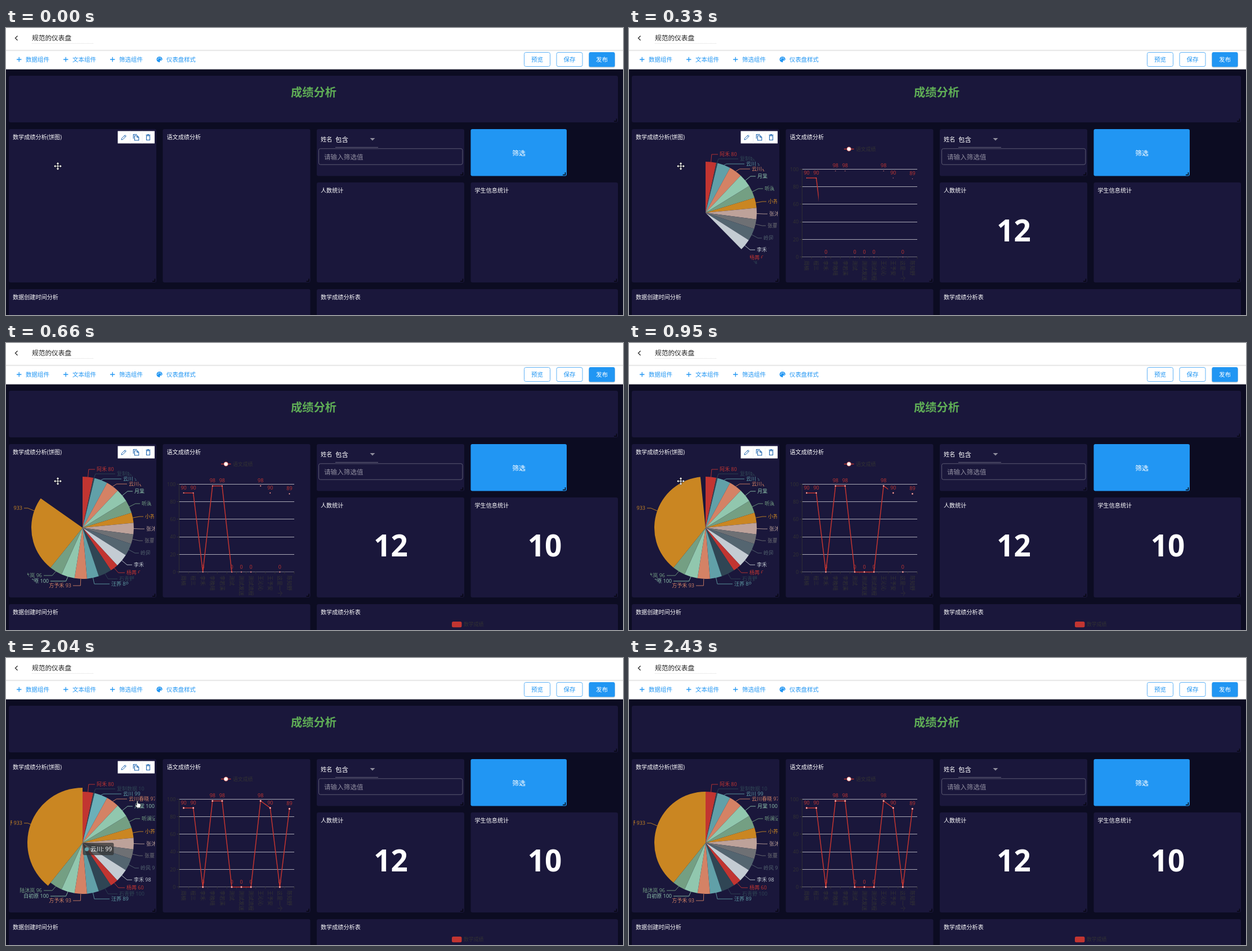
Write an HTML page that moves like this. It is 1096 px wide and 511 px high and loops after 2750 ms.

```html
<!DOCTYPE html>
<html lang="zh-CN">
<head>
<meta charset="utf-8">
<title>仪表盘</title>
<style>
html, body { margin: 0; width: 100%; height: 100%; overflow: hidden; background: #0c0c22; }
svg { display: block; width: 1096px; height: 511px; }
text { font-family: "Open Sans", "Noto Sans CJK SC", "Noto Sans CJK", sans-serif; white-space: pre; }
</style>
</head>
<body>
<svg id="stage" viewBox="0 0 1096 511" xmlns="http://www.w3.org/2000/svg">
  <defs>
    <clipPath id="pieBox"><rect x="8" y="208" width="256.5" height="243"/></clipPath>
    <clipPath id="sweep"><path id="sweepPath"/></clipPath>
    <clipPath id="lineBox"><rect x="282" y="205" width="255" height="246"/></clipPath>
    <clipPath id="wipe"><rect id="wipeRect" x="307" y="240" height="175"/></clipPath>
  </defs>
  <g id="chrome"></g>
  <g id="charts">
    <g clip-path="url(#pieBox)"><g id="pie" clip-path="url(#sweep)"></g></g>
    <g id="line" clip-path="url(#lineBox)"></g>
  </g>
  <g id="count"></g>
  <g id="students"></g>
  <g id="tableLegend"></g>
  <g id="tools"></g>
  <g id="tip"></g>
  <g id="move"></g>
  <g id="hand"></g>
</svg>
<script>
const LOOP = 2750, START = 180, DURATION = 1030;
// The screen refreshes only at these moments (ms).
const TICKS = [0, 170, 250, 330, 410, 490, 570, 660, 720, 800, 880, 950, 1020, 1100, 1180,
  2040, 2110, 2190, 2270, 2350, 2430];
const SETTLED = 1180, LEAVE = 2040, GONE = 2430;
const BLUE = '#2196f3', RED = '#c23531', CARD = '#1a173b', ICON = '#1a62ae';
const PALETTE = [RED, '#2f4554', '#61a0a8', '#d48265', '#91c7ae', '#749f83', '#ca8622',
  '#bda29a', '#6e7074', '#546570', '#c4ccd3'];

const $ = id => document.getElementById(id);

function add(parent, tag, attrs) {
  const el = document.createElementNS('http://www.w3.org/2000/svg', tag);
  for (const key in attrs) el.setAttribute(key, attrs[key]);
  return parent.appendChild(el);
}
const rect = (g, x, y, width, height, fill, more) =>
  add(g, 'rect', { x, y, width, height, fill, ...more });
const stroke = (g, d, color, width = 1, more) =>
  add(g, 'path', { d, fill: 'none', stroke: color, 'stroke-width': width, ...more });
// y is the visual middle of the text
function label(g, str, x, y, size, fill, more) {
  const el = add(g, 'text', { x, y: y + size * 0.37, 'font-size': size, fill, ...more });
  el.textContent = str;
  return el;
}
const MIDDLE = { 'text-anchor': 'middle' }, END = { 'text-anchor': 'end' };

function card(g, x, y, w, h, title, fill = CARD) {
  rect(g, x, y, w, h, fill, { rx: 3 });
  stroke(g, `M${x + w - 2.5} ${y + h - 6.5}v4.5h-4.5`, '#06060f', 1.5);
  if (title) label(g, title, x + 7, y + 14.5, 10.15, '#fff', { 'font-weight': 500 });
}

function buildChrome(g) {
  rect(g, 0, 0, 1096, 73.6, '#fff');
  rect(g, 0, 39, 1096, 1, '#dedede');
  rect(g, 0, 40, 1096, 1.5, '#f3f3f3');
  stroke(g, 'M20.5 14l-4 4 4 4', '#333', 1.4);
  label(g, '规范的仪表盘', 46, 18, 11.7, '#222');
  stroke(g, 'M46 27.5H156', '#ccc', 0.8, { 'stroke-dasharray': '1 1.2' });

  [['数据组件', 23], ['文本组件', 106], ['筛选组件', 189]].forEach(([name, x]) => {
    stroke(g, `M${x - 4} 56h8.4M${x + 0.2} 51.8v8.4`, BLUE, 1.3);
    label(g, name, x + 12, 56, 10.5, BLUE);
  });
  add(g, 'path', { fill: BLUE, d: 'M272.5 51a5 5 0 0 0 0 10q1.6-.2 1-1.8-.4-1.4 1.2-1.4h1.2q2-.2 1.9-2.3a5 4.6 0 0 0-5.3-4.5z' });
  [[269.8, 55.6], [271.4, 53.4], [274, 53.4], [275.7, 55.5]].forEach(([cx, cy]) =>
    add(g, 'circle', { cx, cy, r: 0.8, fill: '#fff' }));
  label(g, '仪表盘样式', 285, 56, 10.4, BLUE);

  [['预览', 920.5], ['保存', 978]].forEach(([name, x]) => {
    rect(g, x, 43.5, 46, 25, '#fff', { rx: 3, stroke: '#5fb2f6' });
    label(g, name, x + 23, 56, 10.6, BLUE, MIDDLE);
  });
  rect(g, 1035, 44.5, 47, 26, '#c9ced3', { rx: 3 });
  rect(g, 1035.5, 43, 46, 26.3, BLUE, { rx: 3 });
  label(g, '发布', 1058.5, 56, 10.6, '#fff', MIDDLE);

  card(g, 5, 85, 1082, 83);
  label(g, '成绩分析', 546.5, 114.5, 20.3, '#5fad56', { ...MIDDLE, 'font-weight': 700 });
  card(g, 5, 180, 262, 273, '数学成绩分析(饼图)');
  card(g, 278.5, 180, 262, 273, '语文成绩分析');
  card(g, 552, 180, 262, 83.5);
  card(g, 825.5, 180, 170.5, 83.5, '', BLUE);
  card(g, 552, 275, 262, 178, '人数统计');
  card(g, 825.5, 275, 261.5, 178, '学生信息统计');
  card(g, 5, 465, 535.5, 80, '数据创建时间分析');
  card(g, 552, 465, 535, 80, '数学成绩分析表');

  label(g, '姓名', 559, 198.5, 10.3, '#fff');
  label(g, '包含', 585, 198.5, 11.5, '#fff');
  stroke(g, 'M585 212.5h76', '#64627a');
  add(g, 'path', { d: 'M646.5 196h9l-4.5 4.5z', fill: '#8f8d9d' });
  rect(g, 555.5, 214.8, 255.5, 28.4, 'none', { rx: 3, stroke: '#64627a', 'stroke-width': 0.9 });
  label(g, '请输入筛选值', 565, 229.5, 11.6, '#8f8d9f');
  label(g, '筛选', 911, 222.5, 11.8, '#fff', MIDDLE);
}

const CX = 136, CY = 329, R = 91;
function polar(angle, r) {
  return [CX + r * Math.sin(angle), CY - r * Math.cos(angle)];
}
function sector(from, to, r) {
  return `M${CX} ${CY}L${polar(from, r)}A${r} ${r} 0 ${to - from > Math.PI ? 1 : 0} 1 ${polar(to, r)}Z`;
}

// name, value, text x, text y
const SLICES = [
  ['阿禾', 80, 161, 225], ['复制数据', 10, 197, 233], ['云川', 99, 208, 242],
  ['云川春晓', 97, 218, 251], ['月棠', 100, 228, 264], ['听澜记', 96, 241, 286],
  ['小荞', 76, 247, 309], ['张沐', 85, 249, 331], ['张蔓', 73, 246, 352],
  ['岭风', 93, 239, 374], ['李禾', 98, 227, 395], ['杨苒', 60, 214, 409],
  ['石青野', 100, 201, 420], ['汪荞', 89, 187, 429], ['方予禾', 93, 116, 432],
  ['白初原', 100, 76, 424], ['陆沐岚', 96, 64, 414], ['田野', 933, 29, 294]
];
const TOTAL = SLICES.reduce((sum, s) => sum + s[1], 0);
const slices = [];

function buildPie(g) {
  let angle = 0;
  SLICES.forEach(([, value], i) => {
    const from = angle, color = PALETTE[i % PALETTE.length];
    angle += value / TOTAL * 2 * Math.PI;
    const el = add(g, 'path', { d: sector(from, angle, R), fill: color });
    slices.push({ el, from, to: angle, color });
  });
  SLICES.forEach(([name, value, x, y], i) => {
    const { from, to, color } = slices[i], mid = (from + to) / 2;
    const left = mid > Math.PI;
    stroke(g, `M${polar(mid, R)}L${polar(mid, 103)[0]} ${y}H${x + (left ? 3 : -3)}`, color, 0.9);
    label(g, `${name} ${value}`, x, y, 9, color, left ? END : {});
  });
}

const SCORES = [90, 90, 0, 98, 98, 0, 0, 0, 98, 90, 0, 89];
const PUPILS = ['周楠', '程三', '李禾', '李晚晴', '李若溪', '测试', '测试发送', '测试流程',
  '王沁沁', '王予安', '这是一个测', '陈知野'];
const px = i => 307 + 205 / 12 * (i + 0.5);
const py = v => 407.7 - 1.564 * v;
const dots = [];

function buildLine(g) {
  stroke(g, 'M382 215.5h17.5', RED, 1.4);
  add(g, 'circle', { cx: 390.7, cy: 215.5, r: 3.8, fill: '#fff', stroke: RED, 'stroke-width': 0.8 });
  label(g, '语文成绩', 403, 215.5, 8.9, '#333');
  for (let v = 0; v <= 100; v += 20) {
    const y = Math.floor(py(v)) + 0.5;
    stroke(g, `M307 ${y}h205`, v ? '#bdbdc6' : '#74747f', 0.9);
    stroke(g, `M303.5 ${y}h3.5`, '#333', 0.9);
    label(g, v, 301.5, py(v), 9, '#333', END);
  }
  stroke(g, 'M307.5 251V407', '#333', 0.9);
  for (let i = 0; i <= 12; i++) stroke(g, `M${307 + i * 205 / 12} 407.5v3.5`, '#333', 0.9);
  PUPILS.forEach((name, i) =>
    label(g, name, 0, 0, 9, '#333', { transform: `translate(${px(i)} 414) rotate(90)` }));
  stroke(g, 'M' + SCORES.map((v, i) => `${px(i)} ${py(v)}`).join('L'), RED, 1.5,
    { 'clip-path': 'url(#wipe)', 'stroke-linejoin': 'bevel' });
  SCORES.forEach((v, i) => {
    dots.push(add(g, 'circle', { cx: px(i), cy: py(v), fill: '#fff', stroke: RED }));
    label(g, v, px(i), py(v) - 9.5, 9, RED, MIDDLE);
  });
}

function buildOverlays() {
  const big = { ...MIDDLE, 'font-weight': 700 };
  label($('count'), '12', 683.5, 360, 53, '#fff', big);
  label($('students'), '10', 957, 360, 53, '#fff', big);
  rect($('tableLegend'), 792, 496, 17.5, 10.3, RED, { rx: 2.5 });
  label($('tableLegend'), '数学成绩', 813, 501, 8.9, '#333');

  const tools = $('tools');
  rect(tools, 0, 0, 65.5, 22, '#fff');
  stroke(tools, 'M22 0v22M43.5 0v22', '#eceff3', 0.8);
  stroke(tools, 'M6.5 15.5l.5-2.4 6-6 1.9 1.9-6 6zM11.8 8.3l1.9 1.9', ICON);
  stroke(tools, 'M27.8 13.5V6h6.5M30 8.2h4.6l2.7 2.7v5.6h-7.3zM34.3 8.5v2.7h2.8', ICON, 1.1);
  stroke(tools, 'M50 7h8M52.5 6.3h3M51 8.5h6v7.5h-6z', ICON, 1.1);

  const tip = $('tip');
  rect(tip, 136.5, 329, 55, 22, 'rgba(50,50,50,.72)', { rx: 3 });
  add(tip, 'circle', { cx: 143.5, cy: 340.5, r: 3.6, fill: PALETTE[2] });
  label(tip, '云川: 99', 150, 340, 10.4, '#fff');

  const arrow = 'M-.6 0V-4.1H-2.3L0-6.7 2.3-4.1H.6V0z';
  ['#000', 'none'].forEach(edge => [0, 90, 180, 270].forEach(a =>
    add($('move'), 'path', { d: arrow, fill: '#fff', stroke: edge, transform: `rotate(${a})` })));
  add($('hand'), 'path', {
    d: 'M-1.8-6q1-1.2 2 0v3.6l3.8.9q1.6.5 1.3 2.4l-.9 4.9h-5.4l-3.4-4.6q-.2-1.5 1.5-.6l1.1 1z',
    fill: '#fff', stroke: '#222', 'stroke-width': 0.7, transform: 'translate(234 261)'
  });
}

const show = (id, on) => $(id).setAttribute('display', on ? 'inline' : 'none');
const place = (id, x, y) => $(id).setAttribute('transform', `translate(${x} ${y})`);

function render(t) {
  const grown = t >= SETTLED ? 1 : Math.max(0, (t - START) / DURATION);
  show('charts', t >= 170);
  show('count', t >= 250);
  show('students', t >= 410);
  show('tableLegend', t >= 490);

  const eased = 1 - (1 - grown) ** 3;
  $('sweepPath').setAttribute('d', grown < 1 ? sector(0, eased * 2 * Math.PI, 128.5) : 'M0 0H1096V511H0Z');
  $('wipeRect').setAttribute('width', 205 * grown);
  const scale = 0.25 + 0.75 * grown;
  dots.forEach(dot => {
    dot.setAttribute('r', 1.5 * scale);
    dot.setAttribute('stroke-width', 0.9 * scale);
  });

  // pointer leaves the pie and crosses the cards to the right
  const away = t - LEAVE, gone = t >= GONE;
  const x = away < 0 ? 92 : 232 + 2.4 * away;
  const y = away < 0 ? 246 : 261 + 0.25 * away;
  const lift = away < 0 ? 0 : 7 * Math.max(0, 1 - away / 300) ** 2;
  const last = slices[slices.length - 1];
  last.el.setAttribute('d', sector(last.from, last.to, R + lift));
  slices[2].el.setAttribute('fill', away === 0 ? '#6bb0b9' : slices[2].color);
  show('tip', away === 0);
  show('hand', away === 0);
  show('move', away !== 0 && !gone);
  place('move', x, y);

  const [right, top] = x < 267 ? [267, 180] : x < 545 ? [540.5, 180] : x < 820 ? [814, 275] : [1087, 275];
  show('tools', !gone);
  place('tools', right - 68.5, top + 3.5);
}

buildChrome($('chrome'));
buildPie($('pie'));
buildLine($('line'));
buildOverlays();

const origin = performance.now();
function frame() {
  const now = Math.max(0, performance.now() - origin) % LOOP;
  render(TICKS.filter(tick => tick <= now).pop());
  requestAnimationFrame(frame);
}
frame();
</script>
</body>
</html>
```
